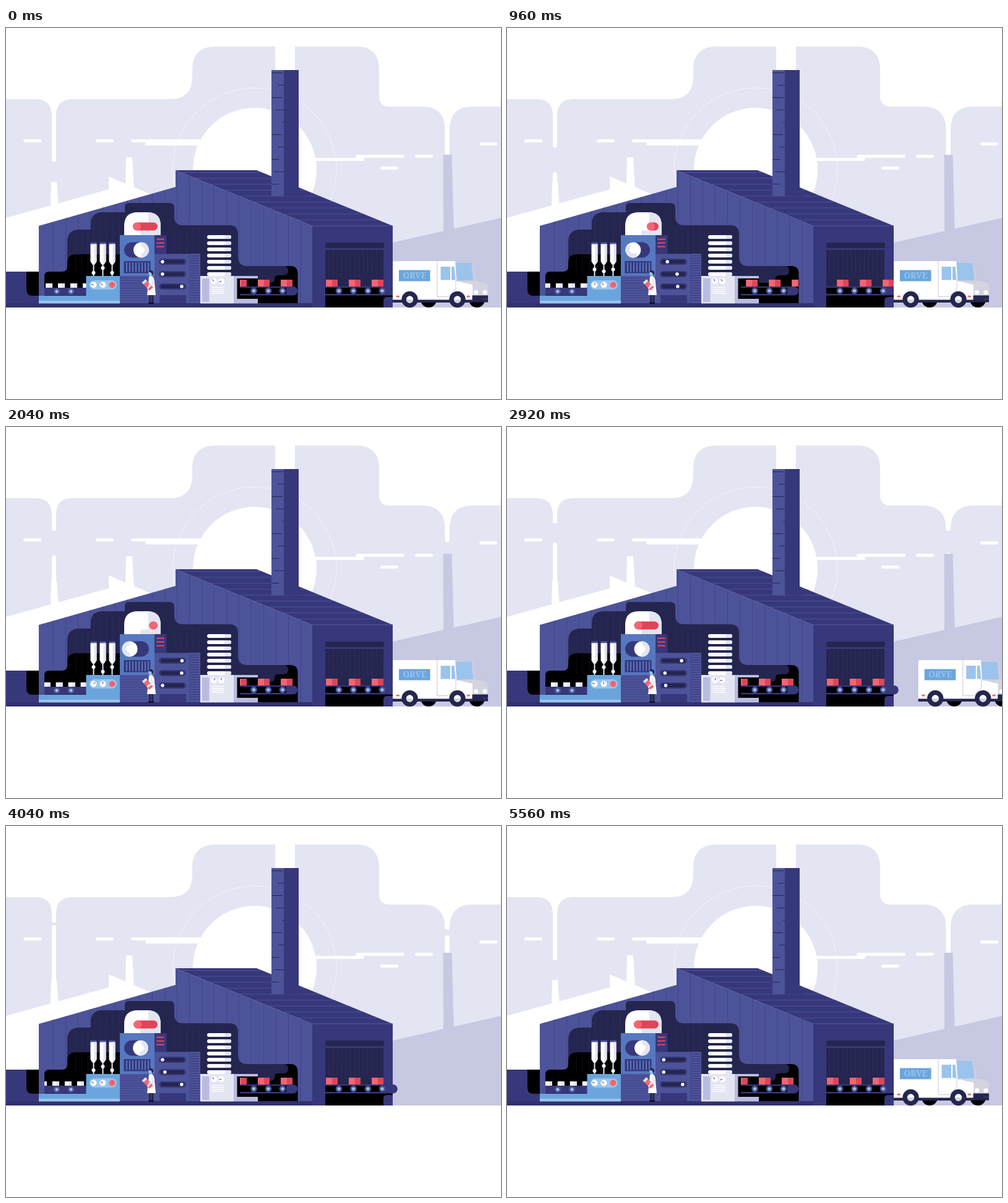
Recreate the animation shown at these times as an HTML page. Size 800 by 600 pixels, loop 5.6 s.

```html
<!DOCTYPE html>
<html lang="en">
<head>
<meta charset="utf-8">
<title>Factory</title>
<style>
html, body { margin: 0; width: 100%; height: 100%; overflow: hidden; background: #fff; }
svg { display: block; width: 800px; height: 600px; }
</style>
</head>
<body>
<svg id="stage" viewBox="0 0 800 600" xmlns="http://www.w3.org/2000/svg"></svg>
<script>
const LOOP = 5600;
const C = {
  sky: '#e3e5f2', hill: '#c7c8e2', lilac: '#b9bbe0', wall: '#4d5399', seam: '#41468b',
  deep: '#37377b', base: '#31316f', navy: '#25264f', black: '#000', white: '#fff',
  blue: '#6aa5dd', pale: '#9ac4ec', panel: '#5678c0', red: '#f66571', crimson: '#de4558'
};
const stage = document.getElementById('stage');
const NS = 'http://www.w3.org/2000/svg';

function add(parent, tag, attrs) {
  const el = document.createElementNS(NS, tag);
  set(el, attrs);
  parent.appendChild(el);
  return el;
}
function set(el, attrs) {
  for (const k in attrs) el.setAttribute(k, attrs[k]);
}
const group = (p, attrs = {}) => add(p, 'g', attrs);
const rect = (p, x, y, width, height, fill, rx = 0) => add(p, 'rect', { x, y, width, height, fill, rx });
const disc = (p, cx, cy, r, fill) => add(p, 'circle', { cx, cy, r, fill });
const shape = (p, d, fill) => add(p, 'path', { d, fill });
const line = (p, d, stroke, w = 1, more = {}) =>
  add(p, 'path', { d, stroke, 'stroke-width': w, fill: 'none', ...more });

const defs = add(stage, 'defs', {});
function clip(id, d) {
  add(add(defs, 'clipPath', { id }), 'path', { d });
  return { 'clip-path': `url(#${id})` };
}

// Sky
shape(stage, `M0 115H47Q74 115 74 142V152.500a3.500 3.500 0 0 0 7 0V142Q81 115 107 115H265
  Q301 115 301 79V67Q301 30 339 30H435V130H467V30H566Q603 30 603 67V110Q603 127 620 127H672
  Q709.500 127 709.500 164.500a3.750 3.500 0 0 0 7.500 0Q717 127 754 127H799V115H800V400H0Z`, C.sky);
disc(stage, 402, 229, 100, C.white);
add(stage, 'circle', { cx: 402, cy: 229, r: 132, fill: 'none', stroke: C.white, 'stroke-width': 1, 'stroke-dasharray': '3 2' });
[[28, 180, 29], [145, 180, 29], [202, 180, 130], [225, 185, 100], [480, 210, 99],
 [565, 205, 79], [661, 205, 29], [605, 224, 29], [765, 185, 29]]
  .forEach(([x, y, w]) => rect(stage, x, y, w, 5, C.white, 2.5));

// Distant hills and stacks
const smoke = {
  leftTop: rect(stage, 74, 140, 7, 10, C.white, 3.5),
  leftLow: rect(stage, 74, 249, 7, 10, C.white, 3.5),
  rightTop: rect(stage, 709.5, 150, 7.5, 10, C.white, 3.5),
  rightLow: rect(stage, 709.5, 205, 7.5, 10, C.white, 3.5)
};
shape(stage, 'M0 307L166 261V240L233 268.500L300 300V452H0Z', C.white);
shape(stage, 'M73 249H82L85 290H72Z M194 209H204L207 260H193Z', C.white);
shape(stage, 'M625 347L800 307V452H625Z M706.500 205H720.500L724 340H707Z', C.hill);

// Factory shell
rect(stage, 0, 394, 60, 58, C.deep);
shape(stage, 'M33 394H62V433H43Q33 433 33 423Z', C.black);
const gable = 'M53 320L274 257V230L495 320V452H53Z';
shape(stage, gable, C.wall);
const seams = group(stage, clip('gable', gable));
for (let x = 76.5; x < 495; x += 20) line(seams, `M${x} 225V445`, C.seam);
const roofPath = 'M274 230H405L625 320H495Z';
shape(stage, roofPath, C.deep);
const roof = group(stage, clip('roof', roofPath));
for (let i = 0; i < 10; i++) line(roof, `M270 ${233.5 + i * 9.6}H630`, C.wall);
rect(stage, 495, 320, 130, 132, C.deep);
line(stage, 'M495 320H625', C.wall);

// Main stack
rect(stage, 429, 68, 20, 204, C.wall);
shape(stage, 'M449 68H473V258L480 272H449Z', C.deep);
[[429, 447], [439, 449], [429, 447], [436, 449], [446, 449], [430, 446], [440, 449], [429, 441], [433, 449], [429, 441]]
  .forEach(([a, b], i) => line(stage, `M${a} ${72.5 + i * 20}H${b}`, C.navy));
line(stage, 'M429 272.500H449', C.seam);

// Cutaway
shape(stage, `M62 433V402q0-8 8-8h21q8 0 8-8V346q0-20 20-20h18v-9q0-19 19-19h36v-9q0-6 6-6h66q8 0 8 8v14
  q0 14 14 14h75q14 0 14 14v37q0 15 15 15h66V445H62Z`, C.navy);
const dots = { 'stroke-dasharray': '2 2' };
const rib = (x, a, b) => line(stage, `M${x} ${a}V${b}`, '#313264', 1, dots);
for (let x = 112.5; x < 184; x += 10) rib(x, x < 140 ? 333 : 306, 365);
for (let x = 272.5; x < 322; x += 10) rib(x, 324, 362);
shape(stage, 'M62 433V402q0-8 8-8h21q8 0 8-8v-6q0-14 14-14h71v67Z', C.black);
for (let x = 112.5; x < 184; x += 10) line(stage, `M${x} 368V400`, '#16172f', 1, dots);
shape(stage, `M407 445V412h20q7 0 7-6v-1q0-5 6-5h9q7 0 7-7.500t-7-7.500h11q11.500 0 11.500 12V445Z`, C.black);
rect(stage, 0, 445, 495, 7, C.base);

function wheels(p, xs, y = 425) {
  xs.forEach(x => { disc(p, x, y, 5.3, C.wall); disc(p, x, y, 2.5, C.pale); });
}
function carton(p, x) {
  rect(p, x, 407, 11, 11, C.red);
  rect(p, x + 10, 407, 9, 11, C.crimson);
}

// Intake belt
const intake = group(group(stage, clip('intake', 'M62 405H130V433H62Z')));
for (let x = -20; x <= 80; x += 20) {
  rect(intake, x, 413, 11, 7, C.white);
  rect(intake, x + 6, 413, 5, 7, C.sky);
}
rect(stage, 62, 420, 68, 13, C.deep);
line(stage, 'M62 432.500H130', C.navy);
wheels(stage, [82, 105], 426);
rect(stage, 53, 433, 131, 8, C.blue);
rect(stage, 53, 441, 131, 4.5, C.pale);

// Syringes
const bulbs = [141.5, 156.5, 171.5].map(x => {
  line(stage, `M${x} 380V402`, C.sky, 2);
  rect(stage, x - 5, 346.5, 10, 4, C.wall);
  shape(stage, `M${x - 5} 349.500h10v28l-3 5h-4l-3-5Z`, C.white);
  shape(stage, `M${x + 1} 349.500h4v28l-3 5h-1Z`, C.sky);
  return disc(stage, x, 396, 3, C.white);
});

// Dial machine
rect(stage, 129.5, 401, 54.5, 40, C.blue);
rect(stage, 135, 408, 44, 15, C.pale, 7.5);
const needles = [];
function gauge(x, y, r, fill, ink) {
  disc(stage, x, y, r, fill);
  const el = line(stage, `M${x} ${y}v${-r * 0.75}`, ink);
  needles.push({ el, x, y });
}
gauge(141.5, 415.5, 5, C.white, C.deep);
gauge(156.5, 415.5, 5, C.white, C.deep);
gauge(171.5, 415.5, 5, C.red, C.crimson);

// Dome press
const dome = 'M191 335V320Q191 298 213 298H228Q250 298 250 320V335Z';
shape(stage, dome, C.white);
const shade = group(stage, clip('dome', dome));
rect(shade, 230, 298, 20, 37, C.sky);
rect(shade, 217, 327.5, 20, 8, C.sky, 3);
const ram = rect(stage, 205, 314.5, 40, 13, C.crimson, 6.5);
const ramHead = disc(stage, 211.5, 321, 6.5, C.red);
rect(stage, 184, 335, 56, 66, C.panel);
rect(stage, 191, 346.5, 40, 25, C.deep, 12.5);
const knob = group(stage);
disc(knob, 0, 0, 12.5, C.white);
shape(knob, 'M0-12.500A12.500 12.500 0 0 1 0 12.500Z', C.sky);
disc(knob, 0, 0, 5.5, C.white);
rect(stage, 190.5, 377, 43, 19.5, C.deep);
for (let x = 194; x < 232; x += 5) rect(stage, x, 379, 2, 15.5, C.panel);
rect(stage, 184, 401, 56, 44, C.wall);
for (let y = 404.5; y < 444; y += 4) line(stage, `M184 ${y}H228`, C.seam);
rect(stage, 240, 335, 19.5, 30, C.deep);
[341.5, 347.5, 353.5].forEach(y => rect(stage, 243, y - 1, 13, 2.3, C.crimson, 1));

// Slider cabinet
rect(stage, 240, 365, 74, 80, C.wall);
rect(stage, 240, 365, 57, 1, C.seam);
for (let y = 368.5; y < 444; y += 4) line(stage, `M298 ${y}H312`, C.deep);
line(stage, 'M297 365V445', C.seam);
rect(stage, 248, 432, 43, 13, C.deep);
const sliders = [378, 398, 418].map(y => {
  rect(stage, 247, y - 5, 44, 10, C.deep, 5);
  rect(stage, 250, y - 3, 38, 6, C.navy, 3);
  return disc(stage, 253, y, 2.8, C.white);
});

// Technician
shape(stage, 'M231 430h7.500v14h-3.200v-11h-1v11H231Z', C.navy);
rect(stage, 230, 444, 9, 1.5, C.black);
shape(stage, 'M231 402q3-2 6 0q3 3 3 10l2 20H228l2-18Z', C.white);
disc(stage, 234, 397, 3.7, C.pale);
shape(stage, 'M230 394q2-3 5-2q4 1 3 6l-2 2l-1-4Z', C.navy);
const board = group(stage);
rect(board, -4, -7, 8, 14, C.red);
rect(board, -4, -11, 8, 4, C.sky);
rect(board, -4, 1, 8, 2, C.white);
const arm = line(stage, 'M236 405L237 416L230 416', C.sky, 2.2, { 'stroke-linejoin': 'round' });

// Packing machine
for (let y = 335; y < 400; y += 10) {
  rect(stage, 325, y, 39, 6, C.white, 3);
  shape(stage, `M353.500 ${y}h7.500a3 3 0 0 1 0 6h-7.500Z`, C.sky);
}
rect(stage, 314, 401, 54, 44.5, C.sky);
rect(stage, 317, 405, 11.5, 38, C.lilac);
gauge(336, 409.5, 5, C.white, C.deep);
gauge(348, 409.5, 5, C.white, C.deep);
for (let y = 419.5; y < 432; y += 3.3) line(stage, `M332 ${y}H353`, C.white, 1.3);
rect(stage, 368, 401, 39, 44.5, C.lilac);
rect(stage, 373.5, 405, 33.5, 33, C.black);

// Packing belt
const belt = group(group(stage, clip('packing', 'M378 400H471V420H378Z')));
shape(stage, 'M378 418H464a7.200 7.200 0 0 1 0 14.500H378Z', C.deep);
rect(stage, 378, 420, 75, 10, C.black);
wheels(stage, [400.5, 424, 447]);
[333, 370, 407, 444].forEach(x => carton(belt, x));

// Loading bay
rect(stage, 516, 347, 95, 9, C.navy, 3);
rect(stage, 516, 359, 94, 93, C.navy);
for (let x = 521.5; x < 610; x += 7) rib(x, 361, 405);
rect(stage, 516, 420, 94, 32, C.black);
shape(stage, 'M609 432H625V435H616Q610 435 610 441V452H609Z', C.black);
const bay = group(group(stage, clip('bay', 'M516 400H626V420H516Z')));
[480, 517, 554, 591].forEach(x => carton(bay, x));
shape(stage, 'M516 418H625.500a7.200 7.200 0 0 1 0 14.500H516Z', C.deep);
rect(stage, 516, 420, 94, 10, C.black);
wheels(stage, [538, 561.5, 585, 608]);

// Van
const van = group(stage);
disc(van, 683, 439, 13, C.black);
disc(van, 761, 439, 13, C.black);
const body = group(van);
shape(body, 'M625 379Q625 377 627 377H752Q754 377 754.500 380L758 409H754V440H625Z', C.white);
shape(body, 'M726 377H752Q754 377 754.500 380L758 410H728Z', C.hill);
shape(body, 'M727 380H752L755 408.500H729Z', C.pale);
shape(body, 'M728 408.500H758L772 411Q779 413 779 419V433H753V416Z', '#d3d4de');
shape(body, 'M726 409L754 415V433H726Z', C.white);
rect(body, 625, 439.5, 130, 4.5, C.navy);
rect(body, 753.5, 432.5, 25.5, 11, C.navy);
line(body, 'M770 438.500H779', C.wall, 0.8);
disc(body, 759.5, 427.5, 3.6, C.white);
disc(body, 774, 427.5, 3.6, C.white);
line(body, 'M697 377V434.500H714L727 422V408', C.hill);
rect(body, 702.5, 386, 15.5, 21.5, C.pale);
shape(body, 'M720 386H724.500L726.500 407.500H720Z', C.pale);
rect(body, 635, 391.5, 50.5, 18, C.blue);
add(body, 'text', {
  x: 660.5, y: 405.3, fill: C.pale, 'text-anchor': 'middle', 'font-size': 13.5,
  'font-weight': 900, 'font-family': '"Noto Serif", "Liberation Serif", serif'
}).textContent = 'ORVE';
rect(body, 630.5, 432.8, 5.5, 2.8, C.red, 1.4);
rect(body, 744.5, 432.8, 5.5, 2.8, C.red, 1.4);
[652.5, 729.5].forEach(x => {
  disc(van, x, 439, 13.2, C.navy);
  disc(van, x, 439, 5.7, C.white);
  shape(van, `M${x - 5.7} 439a5.700 5.700 0 0 0 11.400 0Z`, '#d3d4de');
});

// Motion
const clamp = p => Math.min(1, Math.max(0, p));
const cubic = p => p < 0.5 ? 4 * p ** 3 : 1 - 4 * (1 - p) ** 3;
const sine = p => (1 - Math.cos(Math.PI * p)) / 2;
const mix = (a, b, p) => a + (b - a) * p;
const pos = (t, n) => ((t % n) + n) % n;
// Out and back once per period, 0 to 1 to 0.
function swing(t, period, ease) {
  const p = pos(t, period) / period * 2;
  return ease(p < 1 ? p : 2 - p);
}

const RISE = 0.0236;
// A puff's edge climbs from the stack until it meets the cloud.
const climb = (t, start, from, to) => Math.max(to, from - RISE * pos(t - start, LOOP));
function span(el, top, bottom) {
  set(el, { y: top, height: Math.max(0, bottom - top) });
}

function drawSmoke(t) {
  span(smoke.leftTop, 140, climb(t, 4222, 249, 156));
  if (t < 282 || t > 4222) span(smoke.leftLow, 249, 256);
  else span(smoke.leftLow, climb(t, 282, 249, 156), 256);
  const cut = t > 1240 && t < 4420;
  span(smoke.rightTop, 150, cut ? climb(t, 1240, 205, 168) : 212);
  span(smoke.rightLow, cut && t > 2855 ? climb(t, 2855, 205, 168) : 205, 212);
}

function vanOffset(t) {
  if (t < 2250) return 0;
  if (t < 4000) return 200 * clamp((t - 2250) / 1150) ** 3;
  return 200 * (1 - clamp((t - 4000) / 1050)) ** 3;
}

function draw(t) {
  drawSmoke(t);

  const press = swing(t, 1400, cubic);
  const x = mix(205, 231.5, press);
  set(ram, { x, width: 245 - x });
  set(ramHead, { cx: x + 6.5 });
  set(knob, { transform: `translate(${mix(218.5, 200, press)} 359) rotate(${180 * press})` });

  const slow = swing(t, 1400, sine);
  const fast = swing(t, 800, cubic);
  set(sliders[0], { cx: mix(253, 284.5, swing(t - 15, 800, cubic)) });
  set(sliders[1], { cx: mix(253, 284.5, slow) });
  set(sliders[2], { cx: mix(284, 253, fast) });

  bulbs.forEach((b, i) => set(b, { cy: i === 1 ? mix(388, 396, slow) : mix(396, 388, slow) }));
  const angles = [mix(-75, 50, slow), mix(-60, 0, fast), mix(0, 90, slow), mix(-40, 30, fast), mix(-110, 0, slow)];
  needles.forEach((n, i) => set(n.el, { transform: `rotate(${angles[i]} ${n.x} ${n.y})` }));
  set(board, { transform: `translate(230 417) rotate(${-43 + 3 * fast})` });
  set(arm, { transform: `translate(${-fast} ${fast})` });

  set(intake, { transform: `translate(${52 + pos(12 + t * 20 / 350, 20)} 0)` });

  // Three loads, then the van leaves.
  const loading = t < 2400;
  const step = loading ? t % 800 : 800;
  const shift = step < 350 ? 37 * sine(step / 350) : 0;
  set(belt, { transform: `translate(${shift} 0)` });
  set(bay, { transform: `translate(${shift} 0)` });
  const dip = loading ? Math.sin(Math.PI * clamp((step - 170) / 260)) : 0;
  set(body, { transform: `translate(0 ${dip})` });
  set(van, { transform: `translate(${vanOffset(t)} 0)` });
}

const start = performance.now();
function tick() {
  draw((performance.now() - start) % LOOP);
  requestAnimationFrame(tick);
}
tick();
</script>
</body>
</html>
```
